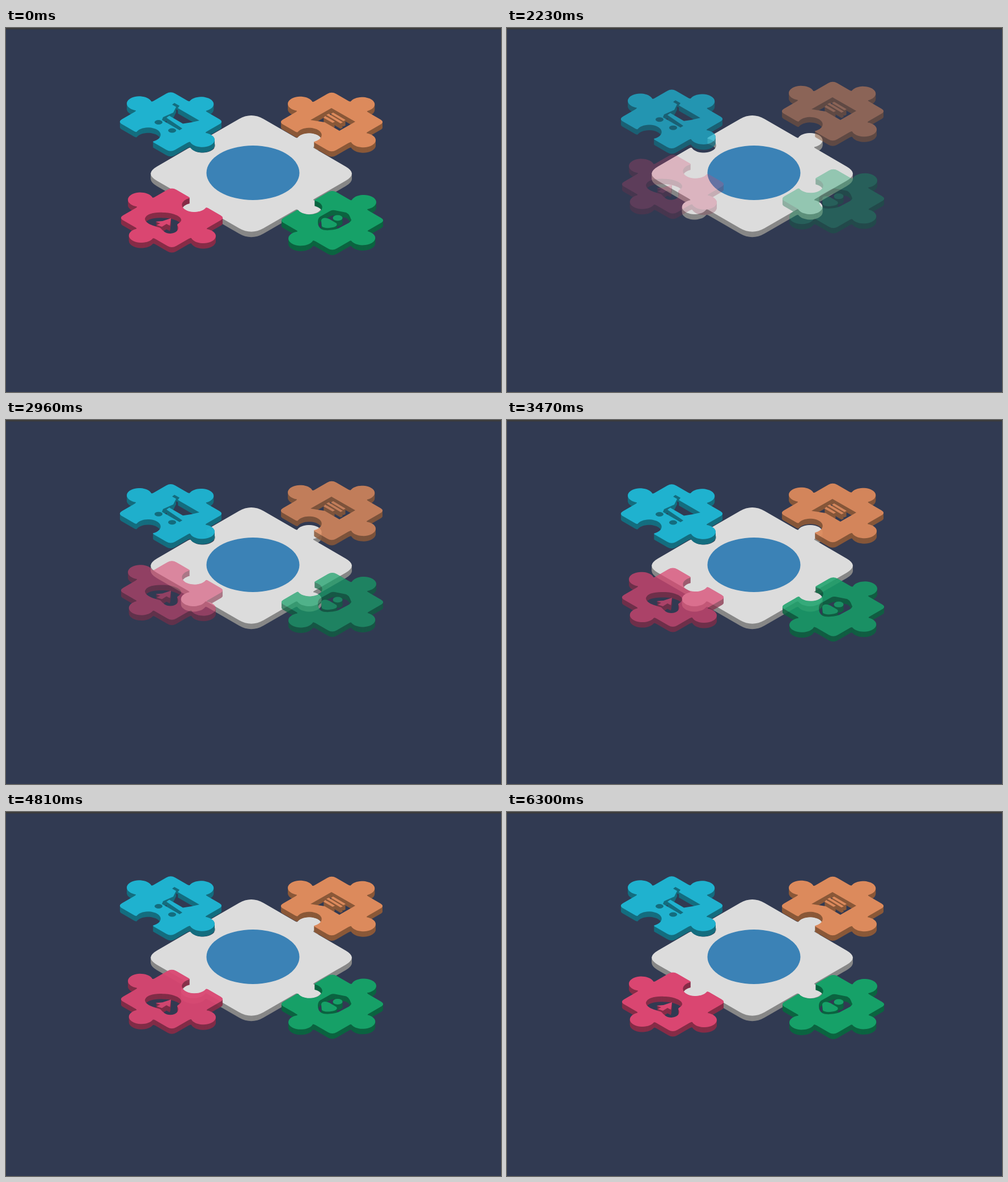
Animation, 873 px wide and 641 px high, one loop 6390 ms. Source, as an HTML page:

```html
<!DOCTYPE html>
<html lang="en">
<head>
<meta charset="utf-8">
<title>Puzzle pieces</title>
<style>
  html, body { margin: 0; width: 100%; height: 100%; overflow: hidden; background: #313a52; }
  svg { display: block; }
</style>
</head>
<body>
<svg id="stage" width="873" height="641" viewBox="0 0 873 641">
  <rect width="873" height="2.5" fill="#3b3a3a"/>
</svg>
<script>
const LOOP = 6390, CUT = 1340, START = 1310, DEPTH = 9.5, KNOB = 18;
const stage = document.getElementById('stage');

function add(parent, tag, attrs) {
  const el = document.createElementNS('http://www.w3.org/2000/svg', tag);
  for (const key in attrs) el.setAttribute(key, attrs[key]);
  return parent.appendChild(el);
}

// Isometric outline; tabs run clockwise from the upper right edge,
// positive values stick out and negative ones cut in.
function outline(cx, cy, half, corner, tabs) {
  let path = '';
  tabs.forEach((tab, k) => {
    const at = (s, out) => {
      let u = s, v = -(half + out);
      for (let i = 0; i < k; i++) [u, v] = [-v, u];
      return (cx + (u - v) * 0.866).toFixed(2) + ',' + (cy + (u + v) * 0.5).toFixed(2) + ' ';
    };
    const sign = Math.sign(tab), dist = Math.abs(tab);
    const low = Math.asin((dist - 1.5) / KNOB);
    const neck = KNOB * Math.cos(low);
    path += (k ? 'L' : 'M') + at(corner - half, 0);
    path += 'L' + at(-20, 0) + 'Q' + at(-neck, 0) + at(-neck, sign * 1.5);
    for (let i = 1; i <= 28; i++) {
      const a = Math.PI + low - (Math.PI + 2 * low) * i / 28;
      path += 'L' + at(KNOB * Math.cos(a), sign * (dist + KNOB * Math.sin(a)));
    }
    path += 'Q' + at(neck, 0) + at(20, 0) + 'L' + at(half - corner, 0);
    path += 'Q' + at(half, 0) + at(half, -corner);
  });
  return path + 'Z';
}

function ellipse(x, y, rx, ry) {
  return `M${x - rx},${y}a${rx},${ry} 0 1 0 ${2 * rx},0a${rx},${ry} 0 1 0 ${-2 * rx},0Z`;
}

// A flat shape with a solid wall below it.
function slab(d, top, side) {
  const g = add(stage, 'g', {});
  const layer = (y, fill) =>
    add(g, 'path', { d, fill, 'fill-rule': 'evenodd', transform: `translate(0 ${y})` });
  for (let y = DEPTH; y > 0; y--) layer(y, side);
  layer(0, top);
  return g;
}

const cart = 'M297,132L306,137L303,141L341,163Q326,167 312,168.5L288,154.5L283,158L311,177L306,180' +
  'L275,162L277,157L295,149L300,139L293,135Z' + ellipse(269, 166, 7, 4) + ellipse(293, 180.5, 7, 4);

const page = 'M574,141L616,165L588,181L562,166L537,162Z' +
  'M577,149L599,162L595,164L573,151Z' +
  'M569,151L594,166L590,168L565,153Z' +
  'M563,155L580,165L576,167L560,158Z';

const pointer = 'M245,336C247,327 262,324 277,325C293,325 309,331 309,338C309,343 302,344 302,347' +
  'C306,353 303,361 290,362C281,362 277,357 272,352C264,349 246,346 245,336Z' +
  'M291,335L289,348L283,345L275,350L266,347L272,344L264,341L276,340Z';

const person = 'M550,342C550,336 552,333 556,331L572,322Q576,320 580,321L600,325Q604,327 606,331' +
  'L609,338Q609,340 605,343L588,352C580,356 562,358 556,354Q550,350 550,342Z' +
  'M556,340C556,333 566,333 573,338L583,344Q585,348 580,350C571,353 560,353 557,349Z' +
  ellipse(585, 334.5, 8.5, 5);

slab(outline(432.6, 256.4, 108.6, 25, [9, 9, 9, -9.5]), '#dcdcdc', '#878787');
add(stage, 'ellipse', { cx: 435.5, cy: 255, rx: 82, ry: 48, fill: '#3b82b6' });

const pieces = [
  { d: outline(290.5, 165, 54, 9, [8, 10, -8, 10]) + cart, top: '#1fb2cf', side: '#146d7f', rise: 20, time: 2000 },
  { d: outline(574.5, 165.5, 54, 9, [8, 10, -8, 10]) + page, top: '#dc8a5c', side: '#8a5838', rise: 40, time: 3000 },
  { d: outline(575.5, 338.7, 54, 9, [10, 8, 10, -8]) + person, top: '#16a168', side: '#0b6440', rise: 60, time: 4000 },
  { d: outline(292.5, 334.3, 54, 9, [-8, 10, 8, 10]) + pointer, top: '#da4671', side: '#862c47', rise: 80, time: 5000 }
];
for (const p of pieces) p.el = slab(p.d, p.top, p.side);

// cubic-bezier(.25, .1, .25, 1)
function ease(x) {
  if (x >= 1) return 1;
  let lo = 0, hi = 1;
  for (let i = 0; i < 24; i++) {
    const s = (lo + hi) / 2;
    if (0.75 * s * (1 - s) + s ** 3 < x) lo = s; else hi = s;
  }
  return 0.3 * lo * (1 - lo) ** 2 + 3 * lo * lo * (1 - lo) + lo ** 3;
}

function draw(now) {
  const t = now % LOOP;
  for (const p of pieces) {
    const e = t < CUT ? 1 : ease((t - START) / p.time);
    p.el.setAttribute('opacity', e.toFixed(4));
    p.el.setAttribute('transform', `translate(0 ${(-p.rise * (1 - e)).toFixed(2)})`);
  }
}

const begin = performance.now();
function tick() {
  draw(performance.now() - begin);
  requestAnimationFrame(tick);
}
tick();
</script>
</body>
</html>
```
